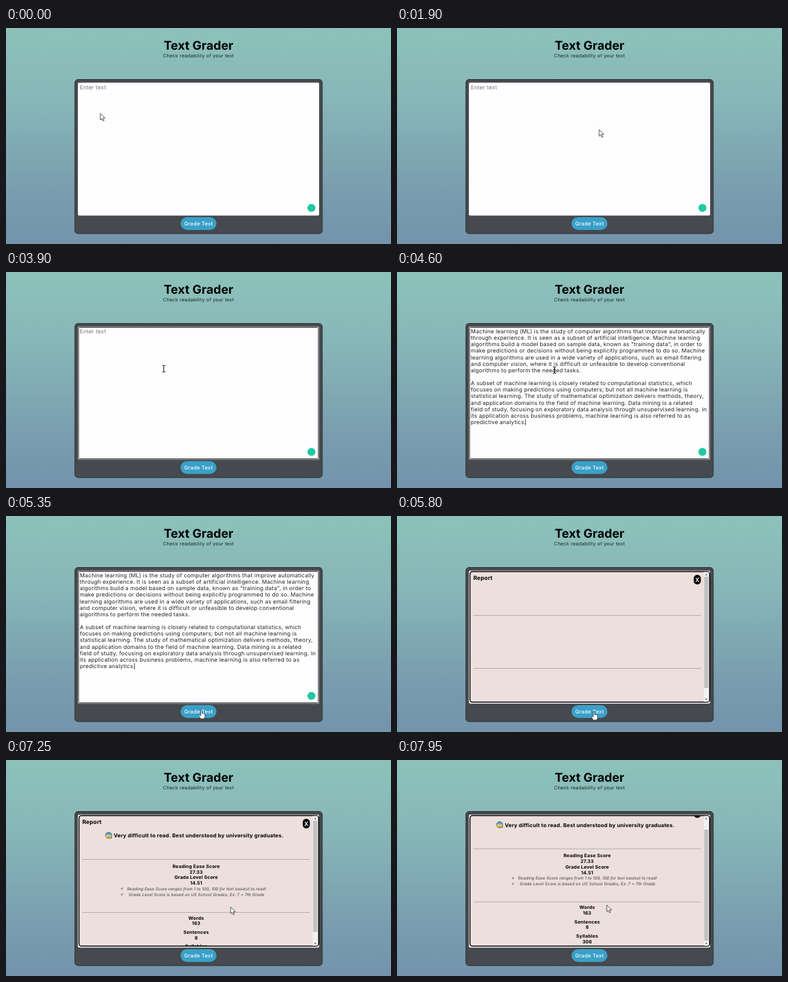
Animation of 600 by 338 pixels, one loop 8000 ms. Source, as an HTML page:

```html
<!DOCTYPE html>
<html lang="en">
<head>
<meta charset="utf-8">
<title>Text Grader</title>
<style>
  html, body { margin: 0; width: 100%; height: 100%; overflow: hidden; background: #7394ab; }
  svg { display: block; width: 100%; height: 100%; }
  text { font-family: Inter, "Open Sans", sans-serif; text-rendering: geometricPrecision; white-space: pre; }
  .mid { text-anchor: middle; }
  .title { font-size: 19px; font-weight: 700; }
  .sub { font-size: 7.5px; letter-spacing: .2px; fill: #1d2626; }
  .body { font-size: 8.6px; letter-spacing: .22px; fill: #222; }
  .hint { fill: #757575; }
  .button { font-size: 8px; font-weight: 500; letter-spacing: .3px; fill: #fff; }
  .head { font-size: 8.8px; font-weight: 700; letter-spacing: .2px; }
  .verdict { font-size: 8.2px; font-weight: 700; letter-spacing: .2px; }
  .stat { font-size: 7.3px; font-weight: 700; letter-spacing: .2px; }
  .note { font-size: 6.3px; font-style: italic; letter-spacing: .14px; fill: #3a3636; }
</style>
</head>
<body>
<svg id="stage" viewBox="0 0 600 338"></svg>
<script>
const LOOP = 8000, STEP = 50;
const FOCUS = 3700, PASTE = 4050, OPEN = 5650;
const MAX_SCROLL = 16.5, THUMB_TRAVEL = 14;

const passage = [
  'Machine learning (ML) is the study of computer algorithms that improve automatically',
  'through experience. It is seen as a subset of artificial intelligence. Machine learning',
  'algorithms build a model based on sample data, known as "training data", in order to',
  'make predictions or decisions without being explicitly programmed to do so. Machine',
  'learning algorithms are used in a wide variety of applications, such as email filtering',
  'and computer vision, where it is difficult or unfeasible to develop conventional',
  'algorithms to perform the needed tasks.',
  '',
  'A subset of machine learning is closely related to computational statistics, which',
  'focuses on making predictions using computers; but not all machine learning is',
  'statistical learning. The study of mathematical optimization delivers methods, theory,',
  'and application domains to the field of machine learning. Data mining is a related',
  'field of study, focusing on exploratory data analysis through unsupervised learning. In',
  'its application across business problems, machine learning is also referred to as',
  'predictive analytics.'
];

// Pointer path: time, x, y
const path = [
  [0, 147, 133.5], [300, 147, 133.5], [850, 235, 172], [1300, 339, 182],
  [1700, 320, 164], [1900, 315, 159], [2250, 543, 112], [2550, 345, 52],
  [2950, 265.5, 5], [3100, 262, -16], [3200, 262, -16], [3400, 256, 26],
  [3700, 247, 145], [4000, 245.5, 153.5], [4750, 245.5, 153.5],
  [5200, 302, 302], [5500, 307, 306], [5850, 307, 306], [5950, 316, 321],
  [6050, 345, 331], [6350, 520, 264], [6500, 532.5, 249], [6600, 532.5, 249],
  [6800, 476, 238], [7250, 350, 230], [7600, 327, 227], [8000, 327, 227]
];

const text = (cls, x, y, s) => `<text class="${cls}" x="${x}" y="${y}">${s}</text>`;
const rect = (x, y, w, h, r, attrs) =>
  `<rect x="${x}" y="${y}" width="${w}" height="${h}" rx="${r}" ${attrs}/>`;
const stat = (y, label, value) =>
  text('stat mid', 296.4, y, label) + text('stat mid', 296.4, y + 8.8, value);
const note = (id, y, s) => `<g id="${id}">
  <circle cx="180.7" cy="${y - 2.2}" r="1.2" fill="none" stroke="#3a3636" stroke-width=".6"/>
  ${text('note mid', 297, y, s)}</g>`;
const rule = y => `<path d="M119 ${y}H473.5" stroke="#b3aaa8"/>`;

const face = `<g transform="translate(160 118)">
  <circle r="5" fill="#f6c944"/>
  <path d="M-5 0A5 5 0 0 1 5 0Q0 -2 -5 0Z" fill="#4c9fd0"/>
  <circle cx="-1.8" cy="-.3" r="1.2" fill="#fff"/><circle cx="1.8" cy="-.3" r="1.2" fill="#fff"/>
  <circle cx="-1.8" cy="-.2" r=".6"/><circle cx="1.8" cy="-.2" r=".6"/>
  <path d="M-2 3.2Q0 1.2 2 3.2Z" fill="#5a3a1c"/>
  <path d="M3.8 1Q6.4 4.9 3.8 5Q1.6 4.9 3.8 1Z" fill="#3f93dc"/>
  <circle r="5" fill="none" stroke="#4b4a38" stroke-width=".6"/></g>`;

const report = `<g id="report">
  ${rect(113.7, 86.9, 373.6, 204.4, 4, 'fill="#ecdfdc" stroke="#000" stroke-width="1.5"')}
  <g clip-path="url(#pane)"><g id="content">
    ${text('head', 119, 100.3, 'Report')}
    ${rect(462.5, 92, 11, 15, 5.5, '')}
    <text class="head mid" x="468.1" y="102.6" fill="#fff">X</text>
    <g id="verdict">${face}${text('verdict', 168, 121, 'Very difficult to read. Best understood by university graduates.')}</g>
    ${rule(155.5)}
    <g id="scores">
      ${stat(168.7, 'Reading Ease Score', '27.33')}
      ${stat(186.2, 'Grade Level Score', '14.51')}
      ${note('note1', 203.5, 'Reading Ease Score ranges from 1 to 100, 100 for text easiest to read!')}
      ${note('note2', 212.5, 'Grade Level Score is based on US School Grades, Ex: 7 = 7th Grade')}
    </g>
    ${rule(238.5)}
    <g id="counts">
      ${stat(249.5, 'Words', '163')}
      ${stat(272, 'Sentences', '8')}
      ${stat(294.3, 'Syllables', '306')}
    </g>
  </g>
  ${rect(478, 87.6, 8, 203, 0, 'fill="#f1f1f1"')}
  ${rect(478.7, 95, 6.6, 174, 0, 'id="thumb" fill="#c1c1c1"')}
  <path d="M480.2 92.5h3.6l-1.8 -2zM480.2 286h3.6l-1.8 2z" fill="#505050"/></g>
</g>`;

document.getElementById('stage').innerHTML = `
  <defs>
    <linearGradient id="sky" x2="0" y2="1">
      <stop stop-color="#8cc2bb"/><stop offset=".3" stop-color="#88b8b8"/>
      <stop offset=".8" stop-color="#789bae"/><stop offset="1" stop-color="#7394ab"/>
    </linearGradient>
    <clipPath id="pane">${rect(114.4, 87, 372.2, 204, 3, '')}</clipPath>
  </defs>
  ${rect(0, 0, 600, 338, 0, 'fill="url(#sky)"')}
  ${text('title mid', 300, 34.3, 'Text Grader')}
  ${text('sub mid', 300, 46, 'Check readability of your text')}
  ${rect(107.3, 80.5, 385.6, 241.3, 5, 'fill="#46494d" stroke="#2a2d30"')}
  ${rect(112, 85.5, 376, 208, 2, 'fill="#fefdff"')}
  ${rect(113.1, 86.6, 373.8, 205.8, 1.5, 'id="ring" fill="none" stroke="#111"')}
  <g id="hint">${text('body hint', 115, 96, 'Enter text')}</g>
  <g id="passage">${passage.map((s, i) => text('body', 115, 96 + i * 10.14, s)).join('')}</g>
  <path id="caret" stroke="#111" stroke-width=".8"/>
  <circle cx="476" cy="281.5" r="6.2" fill="#20c9a0"/>
  ${report}
  ${rect(272, 296, 56, 20, 10, 'fill="#3aa0c8"')}
  ${text('button mid', 300.1, 309.2, 'Grade Text')}
  <path id="arrow" d="M0 0V10.4L2.4 8.2L4.1 12L5.8 11.2L4.2 7.6H7.4Z" fill="#fff" stroke="#222" stroke-width=".8" stroke-linejoin="round"/>
  <path id="beam" d="M-2.4 -5H-.6L0 -4.5L.6 -5H2.4M0 -4.5V4.5M-2.4 5H-.6L0 4.5L.6 5H2.4" fill="none" stroke="#000"/>
  <path id="hand" d="M-1 .8Q0 -.8 1 .8V5Q2 4.2 2.8 5.2Q3.8 4.6 4.4 5.6Q5.6 5.4 5.6 6.8V10L4.4 13.2H-1.4L-3.8 8.4Q-3.6 6.8 -2.2 7.4L-1 8.6Z" fill="#fff" stroke="#222" stroke-width=".7"/>`;

const $ = id => document.getElementById(id);
const show = (id, on) => $(id).setAttribute('visibility', on ? 'visible' : 'hidden');
const move = (id, x, y) => $(id).setAttribute('transform', `translate(${x} ${y})`);
const fade = (id, v) => $(id).setAttribute('opacity', v);
const ramp = (t, a, b) => {
  const k = Math.min(1, Math.max(0, (t - a) / (b - a)));
  return k * k * (3 - 2 * k);
};
const within = (x, y, l, t, r, b) => x >= l && x <= r && y >= t && y <= b;

function pointerAt(t) {
  const i = path.findIndex(p => p[0] > t);
  const [t0, x0, y0] = path[i - 1], [t1, x1, y1] = path[i];
  const k = ramp(t, t0, t1);
  return [x0 + (x1 - x0) * k, y0 + (y1 - y0) * k];
}

function render(t) {
  const focused = t >= FOCUS, pasted = t >= PASTE, open = t >= OPEN;
  show('ring', focused && !open);
  show('hint', !pasted);
  show('passage', pasted && !open);
  show('caret', focused && !open && (t - PASTE + 1000) % 1000 < 600);
  $('caret').setAttribute('d', pasted ? 'M200.2 230.3v9.6' : 'M115.4 88.3v9.6');

  $('report').style.display = open ? '' : 'none';
  fade('report', ramp(t, OPEN - 50, OPEN + 100));
  fade('verdict', ramp(t, 5800, 6150));
  fade('scores', ramp(t, 6000, 6350));
  fade('note1', ramp(t, 6150, 6450));
  fade('note2', ramp(t, 6500, 6750));
  fade('counts', ramp(t, 6200, 6500));
  move('scores', 0, 6.5 * (1 - ramp(t, 6500, 6750)));
  move('counts', 0, 29 * (1 - ramp(t, 6500, 6850)));
  const scroll = ramp(t, 7680, 7850);
  move('content', 0, -MAX_SCROLL * scroll);
  move('thumb', 0, THUMB_TRAVEL * scroll);

  const [x, y] = pointerAt(t);
  const kind = within(x, y, 272, 296, 328, 316) ? 'hand'
    : focused && !open && within(x, y, 112, 86, 488, 293) ? 'beam' : 'arrow';
  for (const id of ['arrow', 'beam', 'hand']) show(id, id === kind);
  move(kind, x, y);
}

const start = performance.now();
function tick() {
  const t = (performance.now() - start) % LOOP;
  render(Math.floor(t / STEP) * STEP);
  requestAnimationFrame(tick);
}
tick();
</script>
</body>
</html>
```
